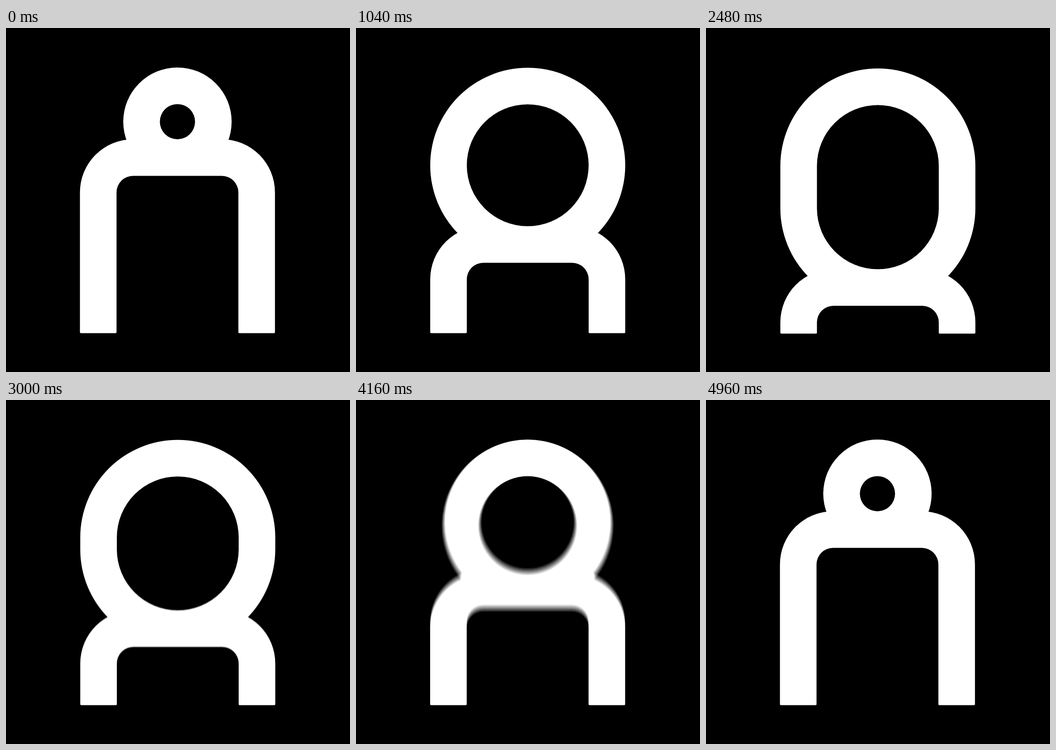
Animation of 748 by 748 pixels, one loop 5.32 s. Source, as an HTML page with a canvas:

```html
<!DOCTYPE html>
<html lang="en">
<head>
<meta charset="utf-8">
<title>Stretching arch</title>
<style>
  html, body { margin: 0; width: 100%; height: 100%; overflow: hidden; background: #000; }
  canvas { display: block; width: 100vw; height: 100vh; }
</style>
</head>
<body>
<canvas id="stage" width="748" height="748"></canvas>
<script>
const ctx = document.getElementById('stage').getContext('2d');

const LOOP = 5320, STEP = 40, MOVE = 1000;
const SHUTTER = 20, SAMPLES = 15;
const LOW = 242, MID = 431, HIGH = 524.5;
const STROKE = 79.5, HALF = 212, INNER = HALF - STROKE;
const BEND = 36, FOOT = 2;

// [start, from, to] for the bottom edge of the hole
const moves = [
  [0, LOW, MID],
  [1297, MID, HIGH],
  [2623, HIGH, MID],
  [3921, MID, LOW]
];

// cubic-bezier(.43, 0, 0, 1)
function ease(u) {
  if (u <= 0) return 0;
  if (u >= 1) return 1;
  let lo = 0, hi = 1;
  for (let i = 0; i < 30; i++) {
    const s = (lo + hi) / 2;
    const x = 1.29 * s * (1 - s) ** 2 + s ** 3;
    if (x < u) lo = s; else hi = s;
  }
  return lo * lo * (3 - 2 * lo);
}

function holeBottom(t) {
  let y = LOW;
  for (const [start, from, to] of moves) {
    if (t >= start) y = from + (to - from) * ease((t - start) / MOVE);
  }
  return y;
}

function capsule(cx, top, bottom, r, reverse) {
  const upper = top + r, lower = Math.max(upper, bottom - r);
  if (reverse) {
    ctx.moveTo(cx + r, upper);
    ctx.arc(cx, upper, r, 0, Math.PI, true);
    ctx.arc(cx, lower, r, Math.PI, 0, true);
  } else {
    ctx.moveTo(cx - r, upper);
    ctx.arc(cx, upper, r, Math.PI, 0);
    ctx.arc(cx, lower, r, 0, Math.PI);
  }
  ctx.closePath();
}

function arch(cx, top, foot) {
  const l = cx - HALF, r = cx + HALF;
  const il = cx - INNER, ir = cx + INNER, itop = top + STROKE;
  const R = BEND + STROKE;
  ctx.moveTo(l, foot - FOOT);
  ctx.arcTo(l, top, cx, top, R);
  ctx.arcTo(r, top, r, foot, R);
  ctx.arcTo(r, foot, ir, foot, FOOT);
  ctx.arcTo(ir, foot, ir, itop, FOOT);
  ctx.arcTo(ir, itop, cx, itop, BEND);
  ctx.arcTo(il, itop, il, foot, BEND);
  ctx.arcTo(il, foot, l, foot, FOOT);
  ctx.arcTo(l, foot, l, top, FOOT);
  ctx.closePath();
}

function figure(b) {
  const p = (b - LOW) / (HIGH - LOW);
  const cx = 372.8 + 0.9 * p;
  const top = 85.9 + 2 * p ** 3;
  const foot = 663.4 + p ** 9;
  const holeTop = top + STROKE;
  const r = Math.min(INNER, (b - holeTop) / 2);
  ctx.beginPath();
  capsule(cx, top, b + STROKE, r + STROKE, false);
  capsule(cx, holeTop, b, r, true);
  arch(cx, b, foot);
  ctx.fill();
}

// Adding faint copies across the shutter time gives the motion blur
function draw(t) {
  ctx.globalCompositeOperation = 'source-over';
  ctx.fillStyle = '#000';
  ctx.fillRect(0, 0, 748, 748);
  ctx.globalCompositeOperation = 'lighter';
  ctx.fillStyle = 'rgb(17, 17, 17)';
  for (let i = 0; i < SAMPLES; i++) {
    figure(holeBottom(t + SHUTTER * (i / (SAMPLES - 1) - 0.5)));
  }
}

function tick() {
  const t = performance.now() % LOOP;
  draw(Math.floor(t / STEP) * STEP);
  requestAnimationFrame(tick);
}
tick();
</script>
</body>
</html>
```
